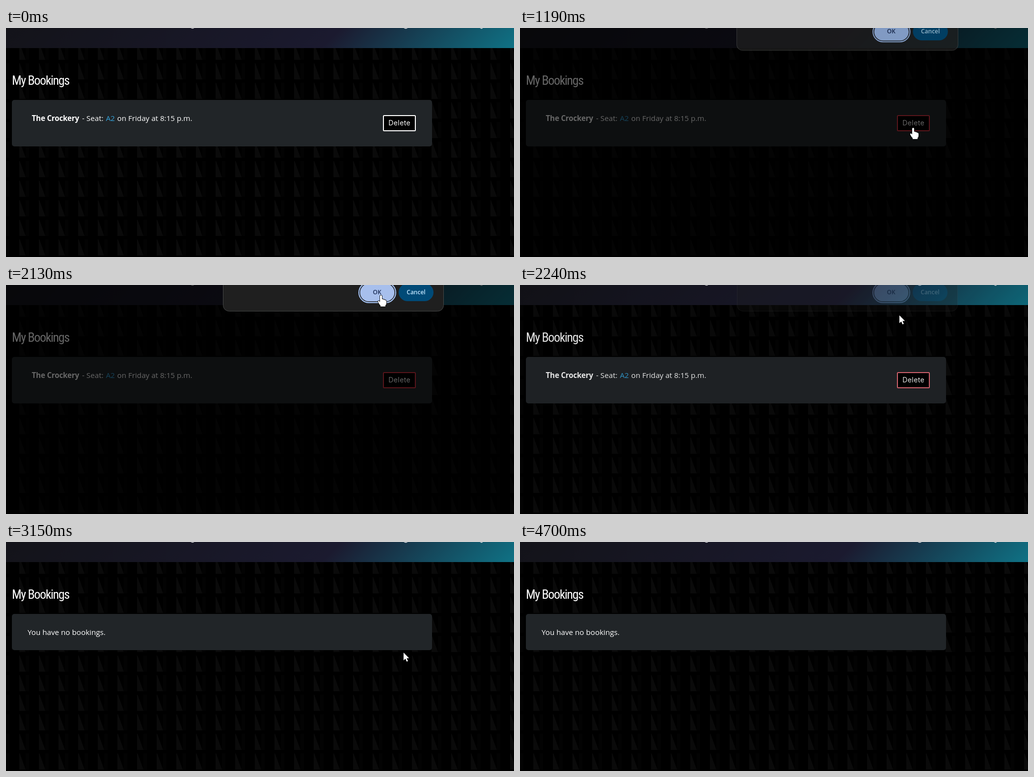
Write an HTML page that moves like this. It is 1035 by 468 pixels and loops after 5.05 s.

```html
<!DOCTYPE html>
<html lang="en">
<head>
<meta charset="utf-8">
<title>My Bookings</title>
<style>
  html, body { margin: 0; width: 100%; height: 100%; overflow: hidden; background: #000; }
  svg { display: block; width: 1035px; height: 468px; }
  text { font: 15.2px "Open Sans", "Noto Sans", sans-serif; fill: #fff; }
  .title { font: 26px "Roboto Condensed", "Liberation Sans Narrow", Roboto, sans-serif; font-stretch: 75%; letter-spacing: -1.35px; }
  .film { font-weight: 700; letter-spacing: -.2px; }
  .seat { fill: #35a4dc; }
  .delete { font: 14px Inter, Lato, sans-serif; letter-spacing: .4px; text-anchor: middle; }
  .choice { font-size: 12px; font-weight: 600; text-anchor: middle; }
  .cursor { fill: #fff; stroke: #000; stroke-width: 1.6; stroke-linejoin: round; paint-order: stroke; }
</style>
</head>
<body>
<svg viewBox="0 0 1035 468">
  <defs>
    <linearGradient id="band" gradientUnits="userSpaceOnUse" x1="0" y1="0" x2="538" y2="538">
      <stop offset="0" stop-color="#131319"/>
      <stop offset=".635" stop-color="#1b1a2f"/>
      <stop offset="1" stop-color="#0f7285"/>
    </linearGradient>
    <pattern id="weave" width="40" height="40" y="32" patternUnits="userSpaceOnUse">
      <path d="M0 0h7v33h-7z" fill="#030303"/>
      <path d="M27 0h1L40 33H27z" fill="#0a0a0a"/>
    </pattern>
  </defs>

  <rect width="1035" height="468"/>
  <rect width="1035" height="468" fill="url(#weave)"/>
  <rect width="1035" height="41" fill="url(#band)"/>
  <path d="M377 -.5q3.5 2 6 0M811 -.5q4 2.5 7 0M966 -.5q3 2.5 5 0" fill="none" stroke="#e4e4e8" stroke-width="1.5"/>

  <text class="title" x="12" y="116">My Bookings</text>
  <rect id="card" x="12" y="147" width="856" height="95" rx="5" fill="#212528"/>
  <g id="booking">
    <text class="film" x="52.5" y="190">The Crockery</text>
    <text x="155" y="190">- Seat:</text>
    <text class="seat" x="203.5" y="190">A2</text>
    <text x="226.5" y="190">on Friday at 8:15 p.m.</text>
    <rect id="frame" x="769" y="179" width="65" height="31" rx="1.5" stroke-width="2"/>
    <text class="delete" x="801.7" y="199">Delete</text>
  </g>
  <text id="empty" x="44" y="190">You have no bookings.</text>

  <rect id="dim" width="1035" height="468"/>
  <g id="dialog">
    <rect x="442.5" y="-100" width="449" height="153.5" rx="12" fill="#1f1f1f" stroke="#454746"/>
    <rect x="719" y="-5" width="75" height="41" rx="20.5" fill="#1f1f1f" stroke="#a8c7fa" stroke-width="2"/>
    <rect id="ok" x="721.5" y="-2.5" width="70" height="36" rx="18"/>
    <text class="choice" x="756" y="19" style="fill:#1b2d57">OK</text>
    <rect x="800" y="-3" width="71" height="36" rx="18" fill="#004a77"/>
    <text class="choice" x="835.5" y="19" style="fill:#c2e7ff">Cancel</text>
  </g>

  <g id="pointer" class="cursor">
    <path id="arrow" d="M0 0V16L3.7 12.6 6.4 18.4 9 17.2 6.3 11.5H11.3Z"/>
    <path id="hand" d="M-2 2Q-2 0 0 0T2 2V8Q4.5 7 5 9 7 8 8 10 10.5 9.5 11 12V16Q11 19 9 20.5V23H-1V21Q-4 18 -6 13.5 -6.5 11 -4 11.5L-2 13.5Z"/>
  </g>
</svg>

<script>
const LOOP = 5050, ENTER = 240, OPEN = 980, CLOSE = 2150, REMOVED = 3150, LEAVE = 4700;
const el = id => document.getElementById(id);

const stops = {
  corner: [946, 463], remove: [801, 204], confirm: [764, 21], rest: [810, 226], edge: [926, 456]
};
const moves = [
  { from: ENTER, to: 740, a: stops.corner, b: stops.remove },
  { from: 1230, to: 2020, a: stops.remove, b: stops.confirm },
  { from: CLOSE, to: 2810, a: stops.confirm, b: stops.rest },
  { from: 4050, to: LEAVE, a: stops.rest, b: stops.edge }
];

const clamp = v => Math.min(1, Math.max(0, v));
const ramp = (t, from, length) => clamp((t - from) / length);
const pulse = (t, on, off, length) => Math.min(ramp(t, on, length), 1 - ramp(t, off, length));
const easeOut = p => 1 - (1 - p) ** 1.5;
const mix = (a, b, k) => a.map((v, i) => Math.round(v + (b[i] - v) * k));

const show = (id, on) => el(id).setAttribute("visibility", on ? "visible" : "hidden");
const set = (id, name, value) => el(id).setAttribute(name, value);

function cursorAt(t) {
  const { from, to, a, b } = moves.findLast(m => t >= m.from) || moves[0];
  return mix(a, b, easeOut(ramp(t, from, to - from)));
}

function draw(t) {
  const booked = t < REMOVED;
  const modal = t >= OPEN && t < CLOSE;
  const [x, y] = cursorAt(t);
  const onDelete = booked && x > 768 && x < 835 && y > 178 && y < 211;
  const onOk = modal && x > 718 && x < 795 && y < 36;

  show("booking", booked);
  show("empty", !booked);
  set("card", "height", booked ? 95 : 74);
  const red = Math.max(pulse(t, 700, 2200, 150), pulse(t, 2580, 2690, 150));
  set("frame", "stroke", `rgb(${mix([255, 255, 255], [220, 53, 69], red)})`);

  set("dim", "opacity", 0.6 * pulse(t, OPEN, CLOSE, 110));
  const drop = 32 * (ramp(t, 1100, 120) - 1);
  const grow = 1 - drop * 0.0005;
  set("dialog", "opacity", pulse(t, 1100, CLOSE, 120));
  set("dialog", "transform", `translate(${667 * (1 - grow)} ${drop}) scale(${grow} 1)`);
  set("ok", "fill", onOk ? "#a7bfec" : "#a8c7fa");

  const seen = t >= ENTER && t < LEAVE;
  const pointing = onDelete || onOk;
  set("pointer", "transform", `translate(${x} ${y})`);
  show("arrow", seen && !pointing);
  show("hand", seen && pointing);
}

const start = performance.now();
function tick(now) {
  draw(Math.max(0, now - start) % LOOP);
  requestAnimationFrame(tick);
}
draw(0);
requestAnimationFrame(tick);
</script>
</body>
</html>
```
